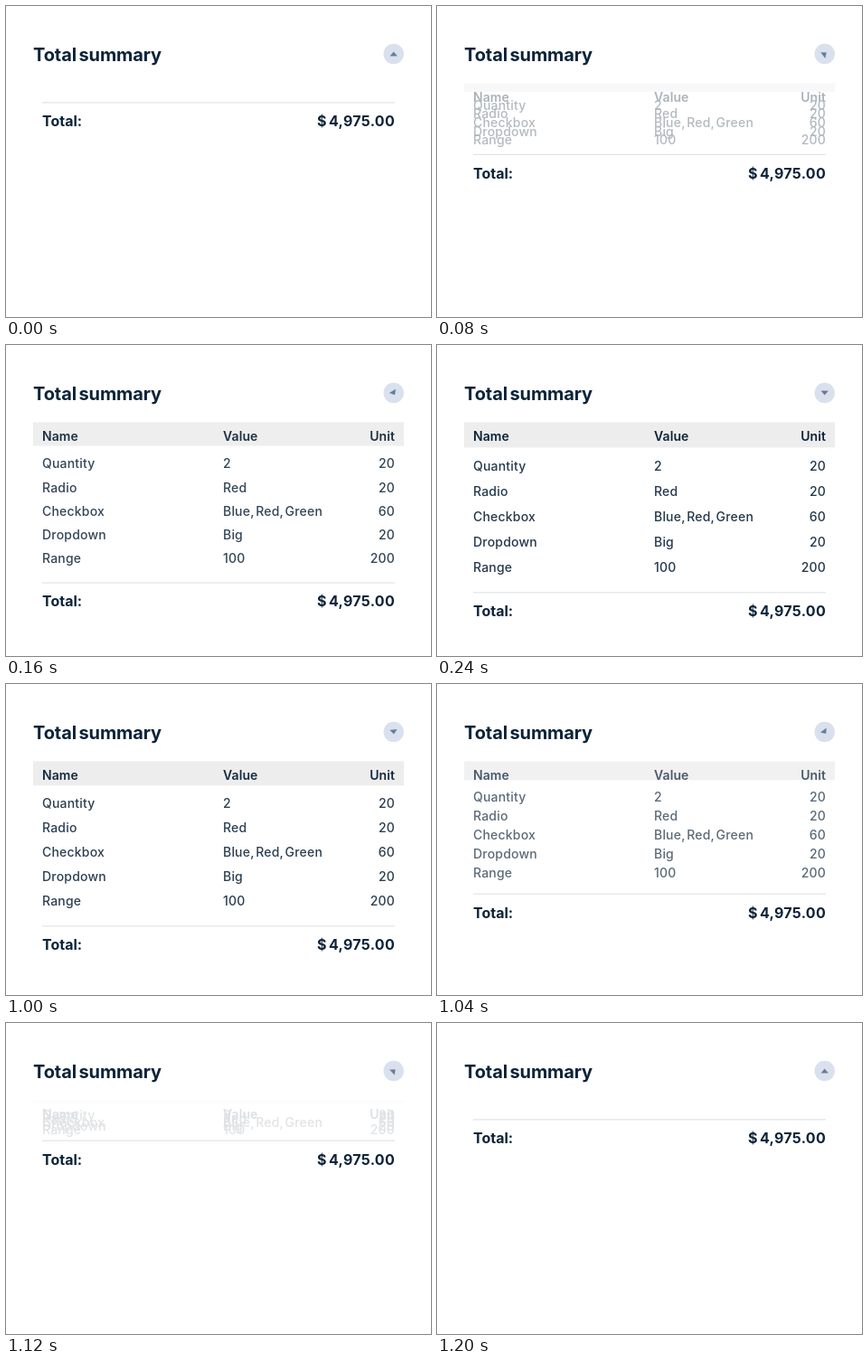
An HTML page that plays this animation: 470x344 px, repeating every 2 s.

```html
<!DOCTYPE html>
<html lang="en">
<head>
<meta charset="utf-8">
<title>Total summary</title>
<style>
  html, body { margin: 0; width: 100%; height: 100%; overflow: hidden; background: #fff; }
  svg { display: block; width: 100vw; height: 100vh; font-family: Inter, "Open Sans", sans-serif; }
  text { fill: #0c2338; white-space: pre; }
  .title { font-size: 20px; font-weight: 650; letter-spacing: -.1px; word-spacing: -2.2px; }
  .total { font-size: 16px; font-weight: 650; }
  .amount { letter-spacing: .3px; word-spacing: -2px; }
  .head { font-size: 14px; font-weight: 600; letter-spacing: .1px; }
  .cell { font-size: 14px; font-weight: 500; letter-spacing: .2px; word-spacing: -2.2px; fill: #24384c; }
  .end { text-anchor: end; }
</style>
</head>
<body>
<svg viewBox="0 0 470 344">
  <text class="title" x="30" y="61.3">Total summary</text>
  <circle cx="428.7" cy="53" r="11.2" fill="#d9e0ee"/>
  <path id="arrow" d="M-3.8 2.3 L0 -2.3 L3.8 2.3 Z" fill="#6c7a92" stroke="#6c7a92" stroke-width=".3" stroke-linejoin="round"/>
  <g id="table">
    <rect id="bar" x="30" y="85.4" width="410" fill="#ededed"/>
  </g>
  <g id="footer">
    <rect x="40" y="-.5" width="390" height="1" fill="#dcdee1"/>
    <text class="total" x="40" y="26.4">Total:</text>
    <text class="total amount end" x="430" y="26.4">$ 4,975.00</text>
  </g>
</svg>
<script>
const LOOP = 2000, STEP = 40, ROW = 28;
const $ = id => document.getElementById(id);
const table = $("table"), bar = $("bar"), footer = $("footer"), arrow = $("arrow");

function addRow(cells, kind) {
  const row = document.createElementNS(table.namespaceURI, "g");
  cells.forEach((label, i) => {
    const text = document.createElementNS(table.namespaceURI, "text");
    text.setAttribute("class", i === 2 ? kind + " end" : kind);
    text.setAttribute("x", [40, 240, 430][i]);
    text.textContent = label;
    row.append(text);
  });
  table.append(row);
  return row;
}

addRow(["Name", "Value", "Unit"], "head").setAttribute("transform", "translate(0 105.7)");
const rows = [
  ["Quantity", "2", "20"],
  ["Radio", "Red", "20"],
  ["Checkbox", "Blue, Red, Green", "60"],
  ["Dropdown", "Big", "20"],
  ["Range", "100", "200"]
].map(cells => addRow(cells, "cell"));

function swing(t, start, length) {
  const x = Math.min(1, Math.max(0, (t - start) / length));
  return (1 - Math.cos(Math.PI * x)) / 2;
}

function draw(time) {
  // The picture advances at 25 steps per second.
  const t = Math.floor((time % LOOP) / STEP) * STEP;
  const open = swing(t, 7, 183) - swing(t, 977, 189);
  const turn = 180 * (swing(t, 0, 220) - swing(t, 975, 220));
  const height = ROW * open;

  table.setAttribute("opacity", open);
  bar.setAttribute("height", height);
  rows.forEach((row, i) =>
    row.setAttribute("transform", `translate(0 ${102.3 + height * (i + 1.304)})`));
  footer.setAttribute("transform", `translate(0 ${106.9 + 167 * open})`);
  arrow.setAttribute("transform", `translate(428.7 53) rotate(${turn})`);
}

const begin = performance.now();
function tick() {
  draw(performance.now() - begin);
  requestAnimationFrame(tick);
}
tick();
</script>
</body>
</html>
```
